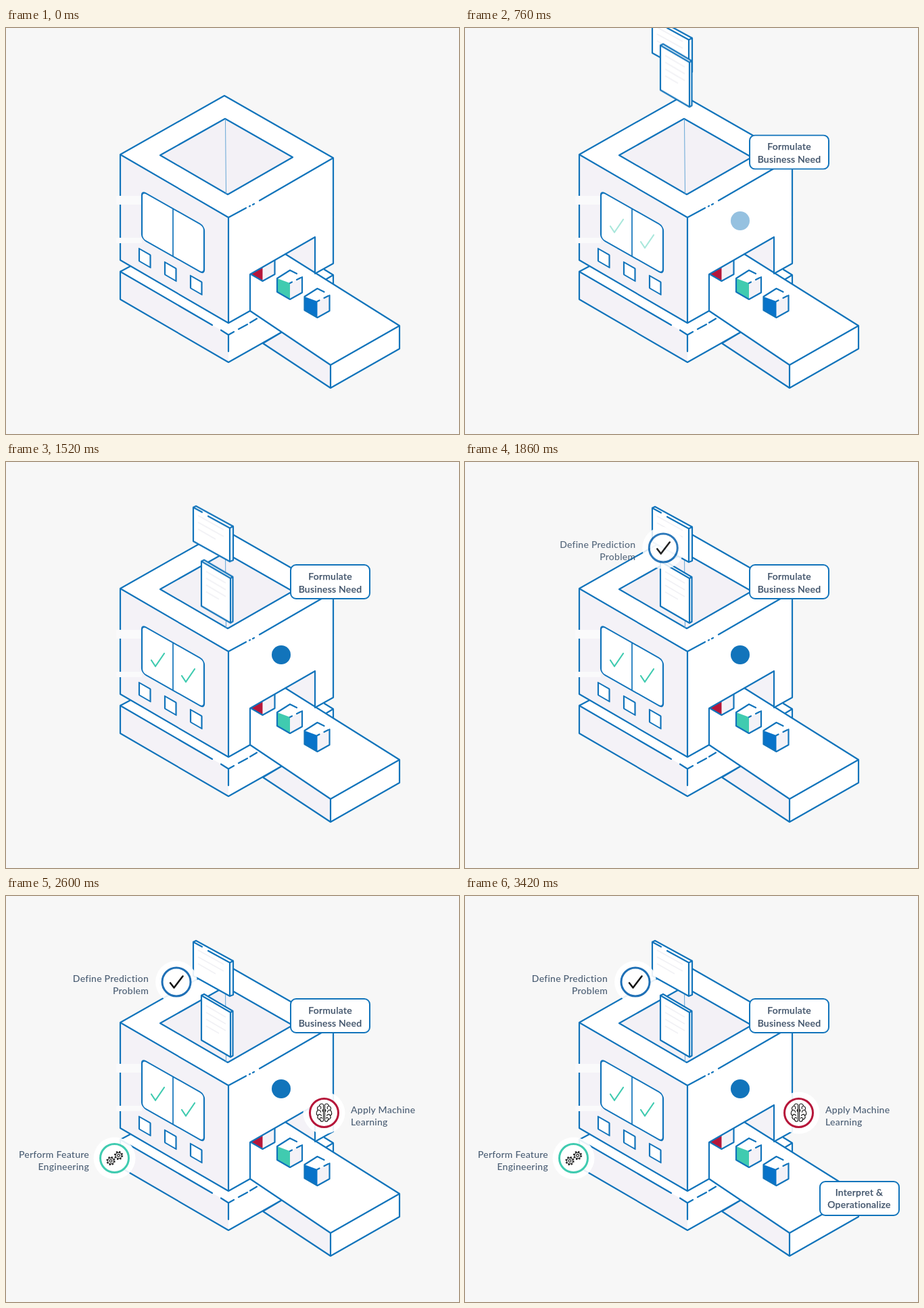
An HTML page that plays this animation: 670 px wide and 600 px high, repeating every 3.92 s.

```html
<!DOCTYPE html>
<html lang="en">
<head>
<meta charset="utf-8">
<title>Prediction machine</title>
<style>
html, body { margin: 0; width: 100%; height: 100%; overflow: hidden; background: #f7f7f7; }
svg { display: block; width: 670px; height: 600px; }
:root { --blue: #1274bb; --green: #40cbb0; --red: #b6163a; --tint: #f4f2f7; }

.line { fill: none; stroke: var(--blue); stroke-width: 2.2; stroke-linecap: round; stroke-linejoin: round; }
.white { fill: #fff; }
.tint { fill: var(--tint); }
.faint { fill: none; stroke: #f1f1f5; stroke-width: 1.5; }
.tick { fill: none; stroke: var(--green); stroke-width: 2.2; stroke-linecap: round; stroke-linejoin: round; }
.ink { fill: none; stroke: #151515; stroke-width: 1.1; stroke-linecap: round; stroke-linejoin: round; }
text { font: 500 14px Lato, "Open Sans", sans-serif; letter-spacing: .25px; fill: #4b5e74; }
.bubble text { text-anchor: middle; fill: #40536a; stroke: #40536a; stroke-width: .25px; }
.bubble rect { fill: #fff; stroke: var(--blue); stroke-width: 2; }
.left text { text-anchor: end; }
.halo { fill: #fff; fill-opacity: .9; }
.ring { fill: #fff; stroke-width: 3; }

.paper1, .paper2, .need, .result, .badge { animation: 3.92s linear infinite; }
.paper1 { animation-name: drop1; }
.paper2 { animation-name: drop2; }
.need { animation-name: rise, show; }
.result { animation-name: arrive; }
.define { animation-name: slideDefine, fadeDefine; }
.perform { animation-name: slidePerform, fadePerform; }
.apply { animation-name: slideApply, fadeApply; }
.lit { animation: light 3.92s linear infinite; }

@keyframes drop1 {
  0%, 11.224% { transform: translateY(-190px); animation-timing-function: cubic-bezier(.333, 1, .667, 1); }
  44.388%, 100% { transform: none; }
}
@keyframes drop2 {
  0%, 11.224% { transform: translateY(-309px); animation-timing-function: cubic-bezier(.333, 1, .667, 1); }
  41.837%, 100% { transform: none; }
}
@keyframes rise {
  0%, 11.224% { transform: translateY(193px); animation-timing-function: cubic-bezier(.22, 1, .36, 1); }
  27.041%, 100% { transform: none; }
}
@keyframes show { 0%, 11.224% { opacity: 0; } 16.327%, 100% { opacity: 1; } }
@keyframes light { 0%, 11.224% { opacity: 0; } 29.592%, 100% { opacity: 1; } }
@keyframes slideDefine {
  0%, 42.092% { transform: translateX(66px); animation-timing-function: cubic-bezier(.455, .03, .515, .955); }
  54.847%, 100% { transform: none; }
}
@keyframes fadeDefine { 0%, 42.092% { opacity: 0; } 47.832%, 100% { opacity: 1; } }
@keyframes slidePerform {
  0%, 48.852% { transform: translateX(66px); animation-timing-function: cubic-bezier(.455, .03, .515, .955); }
  61.607%, 100% { transform: none; }
}
@keyframes fadePerform { 0%, 48.852% { opacity: 0; } 54.592%, 100% { opacity: 1; } }
@keyframes slideApply {
  0%, 58.98% { transform: translateX(-66px); animation-timing-function: cubic-bezier(.455, .03, .515, .955); }
  71.735%, 100% { transform: none; }
}
@keyframes fadeApply { 0%, 58.98% { opacity: 0; } 64.719%, 100% { opacity: 1; } }
@keyframes arrive {
  0%, 79.26% { transform: translateY(193px); animation-timing-function: cubic-bezier(.333, .667, .667, 1); }
  87.245%, 100% { transform: none; }
}
</style>
</head>
<body>
<svg viewBox="0 0 670 600">
  <defs>
    <g id="cube">
      <path class="white" d="M401 370L420 358L438 368L420 377Z"/>
      <path class="tint" d="M420 377L438 368V391L420 401Z"/>
      <path fill="currentColor" d="M401 370L420 377V401L401 390Z"/>
      <path class="line" stroke-width="1.8" d="M430 363L420 358L401 370V390L420 401L438 391V368M420 377L423 375.500M430 372L436 369"/>
    </g>
    <rect id="button" class="line" width="16.500" height="18.500" style="fill:#fff" transform="matrix(1 .57 0 1 197 326)"/>
    <g id="gear" class="ink">
      <circle r="4.400"/>
      <circle r="5.700" stroke-width="1.800" stroke-dasharray="2.240 2.240" stroke-linecap="butt"/>
      <circle r="1.900"/>
    </g>
    <path id="lobe" class="ink" d="M-1 -12C-3 -15 -7 -13 -7 -10C-10 -10 -11 -6 -9 -4C-12 -2 -12 3 -9 4C-11 7 -8 10 -6 10C-5 14 -1 13 -1 11ZM-7 -10C-5 -10 -4 -8 -5 -6M-9 -4C-7 -5 -5 -3 -5 -1M-9 4C-8 1 -5 2 -4 4M-1 -5C-3 -5 -3 -2 -1 -2M-6 10C-7 7 -4 6 -3 8"/>
    <clipPath id="mouth"><path d="M361 364L457 309V420H361Z"/></clipPath>
  </defs>

  <!-- base -->
  <path class="white" d="M169 360L186 351L329 436L361 418L407 450L329 494V453Z"/>
  <path class="tint" d="M169 360L329 453V494L169 401Z"/>
  <path class="white" d="M457 363L470 356L484 365V380Z"/>
  <path class="line" d="M186 351L169 360V401L329 494L407 450M169 360L305 439M318 446.500L329 453.500V478M329 453.500L337 449M344 445L357 438M361 435.500L371 429.500M471 357L484 365V378M474 371L484 365"/>

  <!-- body -->
  <path class="white" d="M323 100L484 192V348L457 363L361 418L329 436V280L169 187Z"/>
  <path class="tint" d="M169 187L329 280V436L169 343Z"/>
  <path class="line" d="M355 266L329 280L169 187L323 100L484 192L375 255M360 263.500L361 263M365 261L367 260M329 280V436M169 187V343L329 436L361 418M484 192V348L457 363"/>
  <path fill="#fafafb" d="M163 248H201V261H163ZM163 310H201V318H163Z"/>
  <path class="line" style="fill:#f3f1f6" d="M324 134L424 191L328 246L228 188Z"/>
  <path class="line" style="stroke-width:1;stroke:#65a6d6" d="M324.500 135L325.500 245"/>

  <!-- screen -->
  <g transform="matrix(1 .565 0 1 201 241)">
    <rect class="line" width="92" height="70.500" rx="6" style="fill:#fff"/>
    <path class="line" style="stroke-width:1.700" d="M46 0V70"/>
  </g>
  <use href="#button"/>
  <use href="#button" x="38" y="20"/>
  <use href="#button" x="76" y="40"/>
  <g class="lit">
    <path class="tick" d="M215 293L221 302L234 283M260 316L266 325L279 306"/>
    <circle cx="407" cy="285" r="14" fill="#1274bb"/>
  </g>

  <!-- belt -->
  <path class="white" d="M361 418V364L413 334L582 440V474L480 532V498Z"/>
  <path class="tint" d="M413 334L457 309V362ZM480 498V532L380 466L407 450Z"/>
  <g clip-path="url(#mouth)"><use href="#cube" x="-40.500" y="-27" color="#b6163a"/></g>
  <path class="line" d="M361 418V364L457 309V363M413 334L582 440V474L480 532L380 466L407 450M361 418L480 498L582 440M480 498V532"/>
  <use href="#cube" color="#40cbb0"/>
  <use href="#cube" x="40.500" y="27" color="#0873c9"/>

  <!-- papers -->
  <g class="paper1">
    <path class="white" d="M277 68L281 66L336 96V146L331 148L277 118Z"/>
    <path class="faint" d="M284 80L322 101M284 90L322 111M284 100L310 115"/>
    <path class="line" d="M290 75L277 68V118L331 148V98.500L299 81M277 68L281 66L336 96V146L331 148M331 98.500L336 96"/>
  </g>
  <g class="paper2">
    <path class="white" d="M289 147L293 145L335.500 170V236L332 238L289 213Z"/>
    <path class="faint" d="M296 162L325 179M296 172L325 189M296 182L325 199M296 192L315 203"/>
    <path class="line" d="M289 147V213L332 238V172ZL293 145L335.500 170V236L332 238M332 172L335.500 170"/>
  </g>

  <g class="bubble need">
    <rect x="421" y="152" width="117" height="50" rx="8"/>
    <text x="479.500" y="174">Formulate</text>
    <text x="479.500" y="192.500">Business Need</text>
  </g>

  <g class="badge left define">
    <circle class="halo" cx="252" cy="127" r="31"/>
    <circle class="ring" cx="252" cy="127" r="21" stroke="#1f70b6"/>
    <path class="ink" style="stroke-width:2.600" d="M243 128.500L248.500 135.500L261.500 118.500"/>
    <text x="211" y="126.500">Define Prediction</text>
    <text x="211" y="145">Problem</text>
  </g>

  <g class="badge left perform">
    <circle class="halo" cx="160.500" cy="387.500" r="31"/>
    <circle class="ring" cx="160.500" cy="387.500" r="21" stroke="#40cbb0"/>
    <use href="#gear" x="155" y="391.500"/>
    <use href="#gear" x="166.500" y="383.500"/>
    <text x="123" y="386.500">Perform Feature</text>
    <text x="123" y="405">Engineering</text>
  </g>

  <g class="badge apply">
    <circle class="halo" cx="493.500" cy="320.500" r="31"/>
    <circle class="ring" cx="493.500" cy="320.500" r="21" stroke="#b6163a"/>
    <g transform="translate(493.500 320.500)">
      <use href="#lobe"/>
      <use href="#lobe" transform="scale(-1 1)"/>
    </g>
    <text x="533" y="320.500">Apply Machine</text>
    <text x="533" y="339">Learning</text>
  </g>

  <g class="bubble result">
    <rect x="525" y="422" width="117" height="50" rx="8"/>
    <text x="583" y="442.500">Interpret &amp;</text>
    <text x="583" y="461">Operationalize</text>
  </g>
</svg>
</body>
</html>
```
